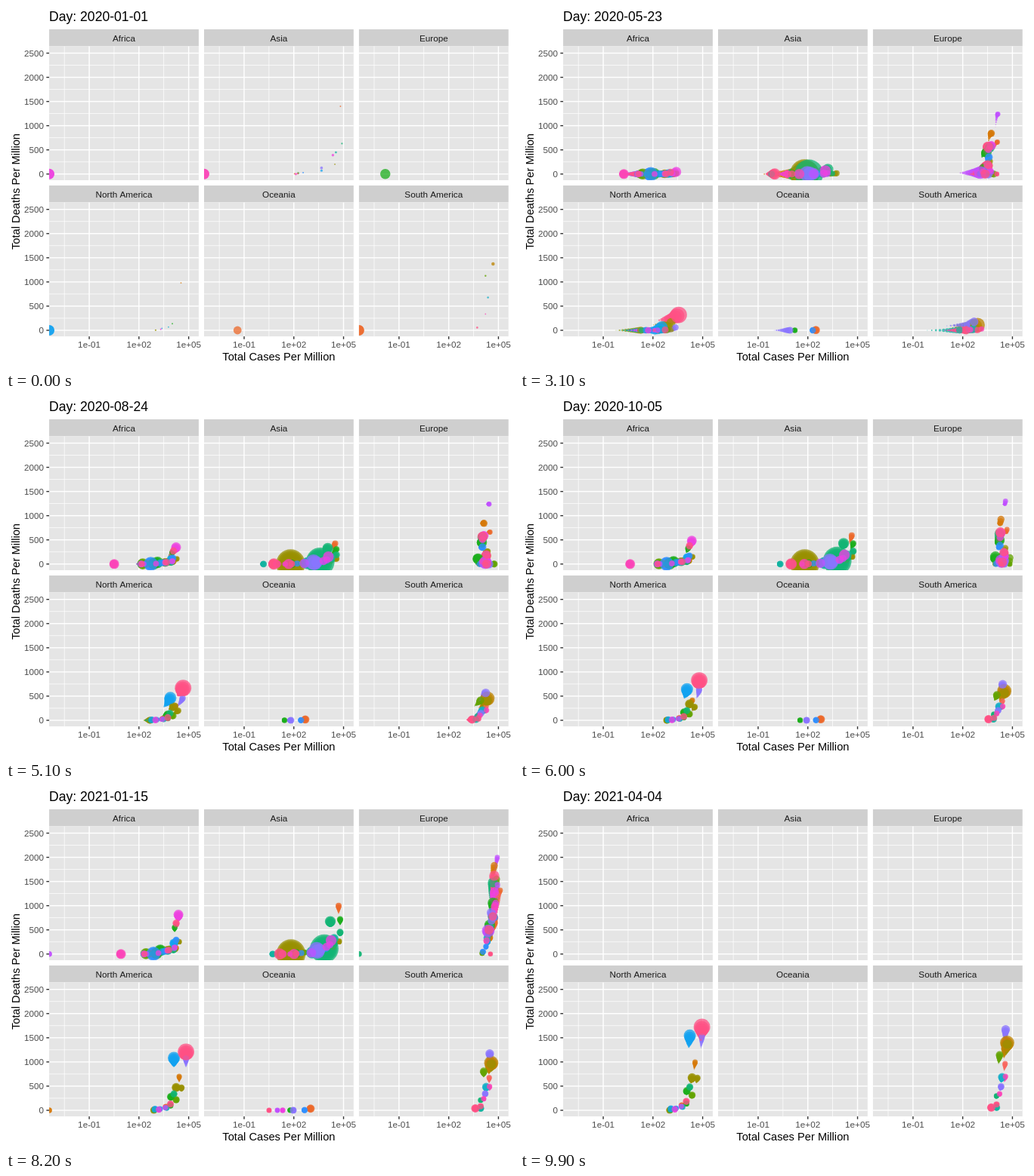
Recreate the animation shown at these times as an HTML page with a canvas. Size 672x480 px, loop 10000 ms.

```html
<!DOCTYPE html>
<html lang="en">
<head>
<meta charset="utf-8">
<title>Total deaths and cases by day</title>
<style>
html, body { margin: 0; width: 100%; height: 100%; overflow: hidden; background: #fff; }
canvas { display: block; }
</style>
</head>
<body>
<canvas id="stage" width="672" height="480"></canvas>
<script>
const ctx = document.getElementById('stage').getContext('2d');
const FONT = '"Liberation Sans", Arial, sans-serif';
const NAMES = ['Africa', 'Asia', 'Europe', 'North America', 'Oceania', 'South America'];
const [AF, AS, EU, NA, OC, SA] = [0, 1, 2, 3, 4, 5];
const ONSET = [8, 4, 6, 6, 9, 10];
const W = 197.8, H = 177.8, WAKE = 10, FRAMES = 100;
const EARLY = 16, LATE = 82;
const HUES = {
  a: '#f8665e', o: '#ec682a', g: '#d67808', b: '#bd8300', c: '#999100', d: '#63a300',
  e: '#1cae1c', i: '#12b574', j: '#12b3a0', k: '#14afc8', m: '#12a2f0', n: '#2f8fff',
  p: '#8a74ff', r: '#c04fff', s: '#ee40e0', t: '#fb45b8', u: '#ff5084'
};
const ORDER = Object.keys(HUES).join('');

let seed = 7;
const rnd = () => (seed = seed * 16807 % 2147483647) / 2147483647;
const clamp = (v, lo = 0, hi = 1) => Math.max(lo, Math.min(hi, v));
const ramp = (f, from, to) => clamp((f - from) / (to - from));
const mix = (a, b, t) => a + (b - a) * t;
const panelX = p => 57.1 + p % 3 * 204.9;
const panelY = p => p < 3 ? 53.2 : 260.3;
const zeroY = p => p < 3 ? 222.8 : 430;

// Hue, population in millions, x at EARLY, x at LATE, deaths at LATE, share of the first wave.
const bubbles = [];
function add(p, rows) {
  for (const [hue, pop, x1, x2, deaths, wave = 0, start = ONSET[p] + Math.floor(rnd() * 4)] of rows) {
    const x0 = Math.min(x1, 75 - 22 * Math.log10(pop)); // one case in the whole population
    bubbles.push({ p, hue, r: 3.3 + .42 * Math.sqrt(pop), x0, x1, x2, deaths, wave, start });
  }
}
// Smaller countries scattered over a range; more cases go with more deaths.
function scatter(p, n, [a1, b1], [a2, b2], max, bend, wave = 0) {
  for (let i = 0; i < n; i++) {
    const u = rnd(), hue = ORDER[Math.floor((i + rnd()) / n * ORDER.length)];
    const deaths = max * u ** bend * mix(.5, 1, rnd());
    add(p, [[hue, .5 + 35 * rnd() ** 3, mix(a1, b1, u), mix(a2, b2, u), deaths, wave * rnd()]]);
  }
}

add(NA, [
  ['u', 331, 102, 181, 1210, .22], ['m', 128, 68, 165, 1085], ['c', 38, 97, 168, 475, .3],
  ['p', 4.3, 90, 181, 1070], ['c', 5, 85, 175, 470], ['i', 10, 60, 165, 340],
  ['e', 18, 70, 161, 280], ['d', 10.8, 82, 168, 220], ['g', .4, 80, 172, 700],
  ['m', 6.6, 55, 140, 24]
]);
scatter(NA, 10, [30, 95], [135, 163], 170, 2);

add(SA, [
  ['b', 212, 73, 175, 980, .06], ['p', 33, 63, 173, 1175, .1], ['c', 51, 60, 175, 960],
  ['o', 45, 62, 174, 1000], ['b', 19, 82, 172, 900], ['d', 17.6, 76, 165, 805, .15],
  ['p', 7, 55, 167, 345], ['t', .6, 65, 165, 240], ['i', .8, 78, 161, 210],
  ['u', 3.5, 98, 161, 85], ['u', 28, 68, 154, 40]
]);
scatter(SA, 4, [25, 98], [160, 174], 850, 1);

add(OC, [
  ['o', 25, 126, 141, 35, .1, 0], ['n', 4.8, 123, 133, 5], ['p', 8.9, 54, 118, 1],
  ['e', .9, 98, 114, 2], ['s', .7, 104, 104, 0, 0, 62], ['u', .3, 86, 86, 0, 0, 64],
  ['r', .2, 97, 97, 0, 0, 64]
]);

add(AS, [
  ['c', 1440, 114, 115, 3, 1], ['i', 1380, 50, 159, 110], ['p', 273, 62, 149, 92],
  ['p', 220, 70, 150, 50], ['g', 165, 20, 150, 48], ['j', 126, 94, 143, 32, .2],
  ['p', 110, 78, 153, 90], ['u', 97, 54, 100, 0], ['s', 84, 95, 168, 280, .2],
  ['i', 84, 110, 167, 675, .1], ['t', 70, 104, 119, 0], ['r', 51, 122, 142, 24, .2],
  ['j', 40, 80, 172, 320], ['a', 39, 60, 146, 60], ['j', 7, 65, 91, 0],
  ['o', 3, 85, 178, 1000], ['e', 4, 80, 180, 720], ['i', 10, 80, 180, 450],
  ['m', 54, 60, 153, 50], ['t', 24, 88, 104, 0]
]);
scatter(AS, 16, [60, 122], [108, 179], 300, 2);

add(AF, [
  ['s', 59, 113, 171, 815], ['t', 60, 76, 95, 0], ['u', 12, 95, 168, 640],
  ['e', 1.2, 100, 166, 550], ['m', 37, 95, 165, 225], ['n', 6.9, 85, 168, 290],
  ['c', .6, 110, 172, 255], ['e', 102, 73, 147, 80], ['n', 206, 82, 138, 8],
  ['e', 115, 72, 142, 18], ['d', 90, 74, 128, 7], ['d', 1, 137, 156, 61]
]);
scatter(AF, 30, [48, 112], [123, 169], 160, 2);

add(EU, [
  ['r', .03, 160, 183, 2000, .62], ['g', 11.6, 150, 179, 1830, .46], ['o', .08, 158, 187, 1320, .5],
  ['s', 46, 150, 179, 1280, .46], ['u', 68, 143, 179, 1620, .35], ['i', 60, 148, 177, 1480, .37],
  ['e', 67, 140, 177, 1060, .42, 0], ['s', 10, 145, 180, 1010, .5], ['n', 17, 146, 179, 760, .46],
  ['e', 83, 140, 173, 600, .18], ['r', 146, 90, 171, 480, .06], ['u', 44, 106, 172, 500],
  ['p', 38, 112, 175, 860], ['d', 10.7, 120, 182, 1550], ['u', .001, 161, 174, 0]
]);
scatter(EU, 24, [105, 145], [162, 184], 1500, 1.3, .3);
bubbles.sort((a, b) => ORDER.indexOf(a.hue) - ORDER.indexOf(b.hue));

// Bubbles without cases wait on the left edge: first and last frame, radius, hue per panel.
const waiting = [
  [0, 9, 7, 'st-m-o'], [13, 19, 3.5, 'no-ieu'], [66, 69, 2, '-i----'], [79, 86, 3.8, 'r-ig--']
];

// Cases level off the more, the further they have to go.
function cases(b, f) {
  if (f < EARLY) return mix(b.x0, b.x1, ramp(f, b.start, EARLY));
  const power = clamp(1 + (b.x2 - b.x1 - 35) / 8, 1, 4);
  const t = 1 - (1 - ramp(f, EARLY, LATE)) ** power;
  return mix(b.x1, b.x2, t) + .15 * Math.max(0, f - LATE);
}
// A first wave in spring, then a steady rise, which comes later in Europe.
function deaths(b, f) {
  if (f > LATE) return b.deaths * (1 + .025 * (f - LATE));
  const first = Math.sin(ramp(f, 10, 31) * Math.PI / 2);
  return b.deaths * mix(ramp(f, b.p === EU ? 58 : 28, LATE), 1, b.wave * first);
}

function disc(hue, x, y, r) {
  ctx.fillStyle = HUES[hue];
  ctx.beginPath();
  ctx.arc(x, y, r, 0, 7);
  ctx.fill();
}
function drawBubble(b, f, size) {
  if (f >= b.start)
    disc(b.hue, panelX(b.p) + cases(b, f), zeroY(b.p) - deaths(b, f) * .0641, b.r * size);
}
function rect(color, x, y, w, h) {
  ctx.fillStyle = color;
  ctx.fillRect(x, y, w, h);
}
function text(str, x, y, size, color, align = 'center') {
  ctx.font = `${size}px ${FONT}`;
  ctx.fillStyle = color;
  ctx.textAlign = align;
  ctx.fillText(str, x, y);
}

function drawGrid(p, x, y) {
  for (let i = 0; i < 11; i++) {
    const w = i % 2 ? .71 : 1.42;
    rect('#fff', x, zeroY(p) - i * 16.03 - w / 2, W, w);
  }
  for (let i = 0; i < 6; i++) {
    const w = i % 2 ? 1.42 : .71;
    rect('#fff', x + 20.1 + i * 32.88 - w / 2, y, w, H);
  }
}

function drawPanel(p, f) {
  const x = panelX(p), y = panelY(p);
  rect('#cfcfcf', x, y - 22.3, W, 22.3);
  text(NAMES[p], x + W / 2, y - 6.2, 11.73, '#1a1a1a');
  rect('#e5e5e5', x, y, W, H);
  ctx.save();
  ctx.beginPath();
  ctx.rect(x, y, W, H);
  ctx.clip();
  drawGrid(p, x, y);

  const americas = p === NA || p === SA;
  const group = bubbles.filter(b => b.p === p);
  ctx.globalAlpha = .75;
  // Only the Americas report on the last day.
  if (f < FRAMES - 1 || americas) {
    for (const b of group)
      for (let k = WAKE - 1; k > 0; k--) drawBubble(b, f - k, 1 - k / WAKE);
    for (const b of group) drawBubble(b, f, 1);
  }
  // The end of the last round fades out at the start of the next.
  if (f < 3 && (americas || p === AS))
    group.filter((b, i) => i % 3 === 2).forEach(b => drawBubble(b, FRAMES - 2, .24 - f * .08));
  ctx.globalAlpha = .95;
  for (const [from, to, r, hues] of waiting)
    if (f >= from && f <= to && HUES[hues[p]]) disc(hues[p], x, zeroY(p), r);
  ctx.restore();
}

function drawAxes() {
  for (const p of [AF, NA])
    for (let i = 0; i < 6; i++) {
      const y = zeroY(p) - i * 32.06;
      rect('#333', 53.4, y - .7, 3.7, 1.4);
      text(i * 500, 50, y + 4.2, 11.73, '#4d4d4d', 'right');
    }
  for (const p of [NA, OC, SA])
    ['1e-01', '1e+02', '1e+05'].forEach((label, i) => {
      const x = panelX(p) + 53 + i * 65.76;
      rect('#333', x - .7, 438.1, 1.4, 3.7);
      text(label, x, 453.2, 11.73, '#4d4d4d');
    });
  text('Total Cases Per Million', 360.9, 470, 14.67, '#000');
  ctx.save();
  ctx.translate(18, 246);
  ctx.rotate(-Math.PI / 2);
  text('Total Deaths Per Million', 0, 0, 14.67, '#000');
  ctx.restore();
}

function draw() {
  const f = Math.floor(performance.now() / 100) % FRAMES;
  rect('#fff', 0, 0, 672, 480);
  const day = Math.floor(f * 459 / 99);
  const date = new Date(Date.UTC(2020, 0, 1 + day)).toISOString().slice(0, 10);
  text('Day: ' + date, 57, 20, 17.6, '#000', 'left');
  for (let p = 0; p < 6; p++) drawPanel(p, f);
  drawAxes();
  requestAnimationFrame(draw);
}
draw();
</script>
</body>
</html>
```
